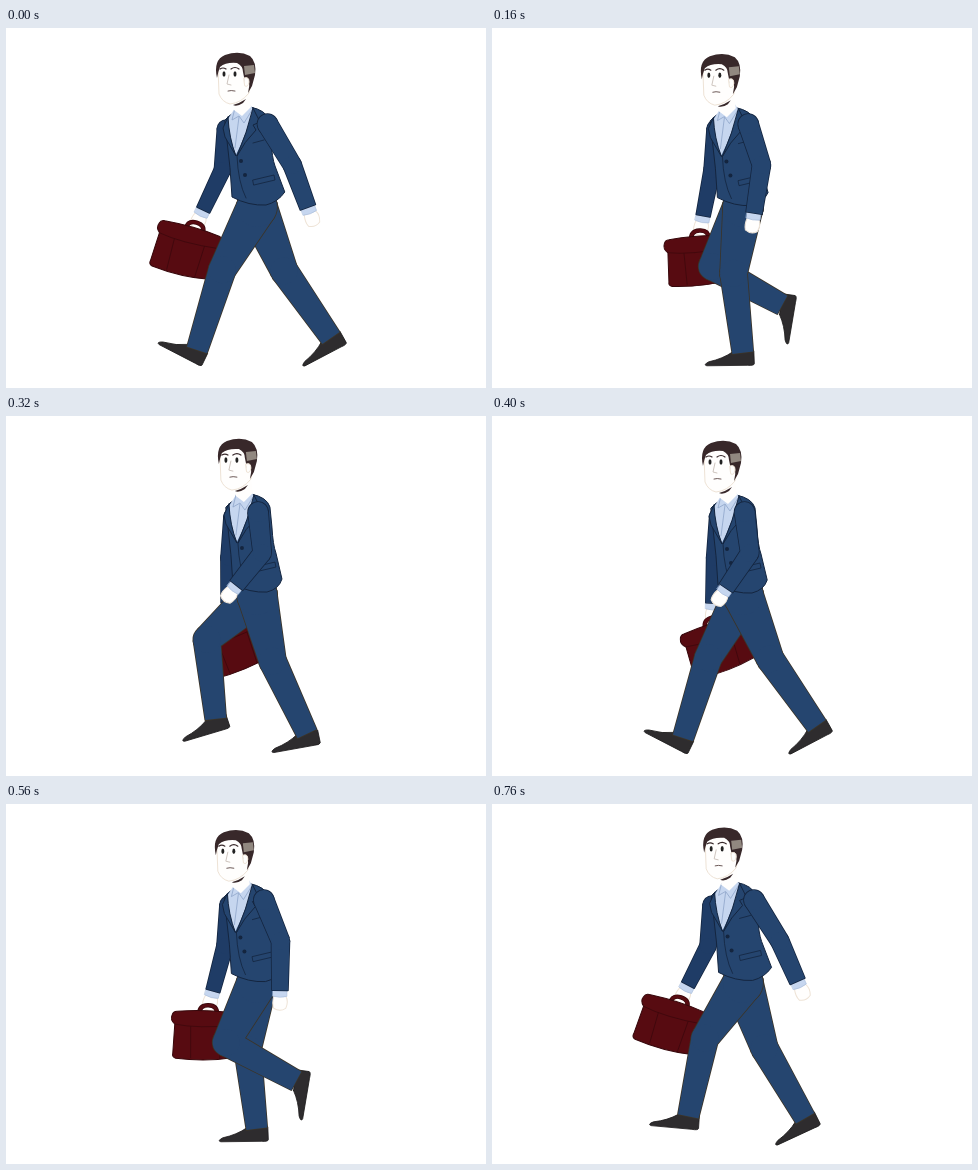
Animation, 480 px wide and 360 px high, one loop 0.8 s. Source, as an HTML page with a canvas:

```html
<!DOCTYPE html>
<html lang="en">
<head>
<meta charset="utf-8">
<title>Walking man</title>
<style>
  html, body { margin: 0; width: 100%; height: 100%; overflow: hidden; background: #fff; }
  canvas { display: block; }
</style>
</head>
<body>
<canvas id="stage" width="480" height="360"></canvas>
<script>
const ctx = document.getElementById('stage').getContext('2d');
const LOOP = 800, STEP = 40;
const SUIT = '#25456f', FAR_SLEEVE = '#1f3c66', LINE = '#14253f', EDGE = '#3b3428', SHIRT = '#c6d6ef';
const SKIN = '#fffefd', SKIN_EDGE = '#eee3d6', HAIR = '#38282a', SHOE = '#2e2c2e';
const BAG = '#570b11', BAG_LINE = '#36070b';
const HIP = [251, 179], THIGH = 67, SHIN = 80;
const FRONT_X = 191, STRIDE = 134;

const clamp = v => Math.min(1, Math.max(0, v));
const smooth = v => v * v * (3 - 2 * v);

function shape(d, fill, stroke, width = 1) {
  const path = new Path2D(d);
  if (fill) { ctx.fillStyle = fill; ctx.fill(path); }
  if (stroke) { ctx.strokeStyle = stroke; ctx.lineWidth = width; ctx.stroke(path); }
}

function placed(x, y, degrees, draw) {
  ctx.save();
  ctx.translate(x, y);
  ctx.rotate(degrees * Math.PI / 180);
  draw();
  ctx.restore();
}

// Tapered, jointed limb; each joint is [x, y, radius]
function limb(a, b, c, fill, edge) {
  const path = new Path2D();
  for (const [p, q] of [[a, b], [b, c]]) {
    const dx = q[0] - p[0], dy = q[1] - p[1], len = Math.hypot(dx, dy);
    const nx = -dy / len, ny = dx / len;
    path.moveTo(p[0] + nx * p[2], p[1] + ny * p[2]);
    path.lineTo(q[0] + nx * q[2], q[1] + ny * q[2]);
    path.lineTo(q[0] - nx * q[2], q[1] - ny * q[2]);
    path.lineTo(p[0] - nx * p[2], p[1] - ny * p[2]);
    path.closePath();
  }
  const joints = new Path2D();
  for (const [x, y, r] of [a, b]) {
    joints.moveTo(x + r, y);
    joints.arc(x, y, r, 0, 2 * Math.PI);
  }
  ctx.strokeStyle = edge;
  ctx.lineWidth = 1.6;
  ctx.stroke(path);
  ctx.stroke(joints);
  ctx.fillStyle = fill;
  ctx.fill(path);
  ctx.fill(joints);
}

// First half of the cycle the foot is planted and drifts back, then it swings forward
function foot(cycle) {
  const p = cycle * 2 % 1;
  if (cycle < 0.5) {
    return {
      x: FRONT_X + STRIDE * p ** 0.88,
      y: 326 - 4 * (1 - p) ** 6 - 16 * p ** 3,
      angle: 28 * clamp(1 - 5 * p) - 27 * smooth(clamp((p - 0.7) / 0.25))
    };
  }
  const lift = Math.sin(Math.PI * p ** 0.7);
  return {
    x: FRONT_X + STRIDE * (1 - smooth(p ** 1.2)),
    y: 310 + 12 * p - 38 * lift,
    angle: -27 + 55 * p - 75 * lift
  };
}

// The knee always bends forward, to the left
function knee(ankle) {
  const dx = ankle.x - HIP[0], dy = ankle.y - HIP[1], d = Math.hypot(dx, dy);
  const along = (THIGH ** 2 - SHIN ** 2 + d * d) / (2 * d);
  const bend = Math.sqrt(Math.max(60, THIGH ** 2 - along ** 2));
  return [HIP[0] + (dx * along - dy * bend) / d, HIP[1] + (dy * along + dx * bend) / d];
}

function leg(cycle) {
  const ankle = foot(cycle % 1);
  placed(ankle.x, ankle.y, ankle.angle, () =>
    shape('M-10 -1 L11 -2 L11.5 11 Q11 13 5 12.5 L-36 13 Q-40 12 -34 9 Q-20 6 -10 -1Z', SHOE, '#1d1b1c', 0.8));
  limb([...HIP, 20], [...knee(ankle), 13.5], [ankle.x, ankle.y, 10.5], SUIT, EDGE);
}

// Cuff and hand continuing the forearm
function hand(elbow, wrist) {
  const angle = Math.atan2(wrist[1] - elbow[1], wrist[0] - elbow[0]) * 180 / Math.PI;
  placed(wrist[0], wrist[1], angle - 90, () => {
    shape('M-6 6 Q-8 13 -6 18 Q0 22 6 18 Q9 11 6 6Z', SKIN, SKIN_EDGE);
    shape('M-7 -1 L7 -1 L7 6 Q0 8 -7 6Z', SHIRT, '#a9bddb', 0.6);
  });
}

function bag() {
  const handle = 'M-9 6 Q-9 -3 0 -3 Q9 -3 9 6';
  shape(handle, null, BAG_LINE, 4.4);
  shape(handle, null, BAG, 3);
  shape('M-31 4 Q0 1 26 4 Q31 6 30 14 L29 48 Q0 54 -31 51 Q-35 50 -34 46 L-33 17 Q-38 13 -36 8 Q-35 4 -31 4Z', BAG, BAG_LINE);
  shape('M-33 17 Q-10 21 29 16 M-17 19 L-16 50 M14 18 L13 50', null, BAG_LINE, 0.6);
}

function torso(swing) {
  const hem = 277 + 2 * swing;
  shape(`M219 92 Q226 83 244 79 Q260 82 263 92 L265 112 Q266 130 269 138 L${hem} 164 Q272 174 260 177 Q243 178 226 169 L224 140Z`, SUIT, LINE);
  shape('M222 91 L229 80 L243 75 L247 81 Q241 105 230 127 Q223 112 222 91Z', SHIRT);
  shape('M229 80 L226 92 L233 88 L238 95 L246 82 M233 89 L229 120', null, '#8fa5ca', 0.8);
  shape('M247 80 L254 94 L247 97 L250 102 Q238 114 231 128 Q241 105 247 80Z', SUIT, LINE);
  shape('M222 89 L217 100 L219 109 L230 128 Q223 110 222 89Z', SUIT, LINE);
  shape('M231 128 Q232 154 240 170 M247 115 L258 112 M247 152 L268 147 L269 152 L248 157Z', null, LINE, 0.8);
  for (const [x, y] of [[235, 133], [239, 147]]) {
    shape(`M${x - 2} ${y} a2 2 0 1 0 4 0 a2 2 0 1 0 -4 0`, LINE);
  }
}

function head() {
  shape('M228 70 L228 82 L236 88 L245 79 L243 64Z', SKIN);
  shape('M227 77 Q234 75 240 71 L237 75 Q231 79 227 77Z', HAIR);
  shape('M212 40 L213 66 Q216 74 224 76 Q235 75 243 65 L246 50 L240 32 L218 32Z', SKIN, SKIN_EDGE);
  shape('M211 50 Q207 32 219 27 Q233 22 244 28 Q251 34 249 47 L246 58 L242 65 Q244 58 243 51 L239 54 L237 44 Q237 38 231 35 Q220 34 214 39 Q212 44 211 50Z', HAIR);
  shape('M238 38 L248 37 L249 45 L239 47Z', '#918880');
  shape('M238 50 Q243 48 243 54 Q242 60 239 58Z', SKIN, SKIN_EDGE);
  shape('M214 41 Q217 39 220 41 M225 41 Q229 38 233 41', null, HAIR, 1.2);
  for (const x of [218, 229]) {
    shape(`M${x - 1.5} 46 a1.5 2.8 0 1 0 3 0 a1.5 2.8 0 1 0 -3 0`, '#222');
  }
  shape('M223 47 L221 56 L225 57', null, '#c9bfb8', 0.9);
  shape('M222 63 Q225 62 229 63', null, '#6d5a58');
}

function draw(time) {
  const cycle = time / LOOP;
  const swing = Math.cos(2 * Math.PI * (time - 740) / LOOP);
  const bob = 2 * Math.sin(4 * Math.PI * cycle);
  ctx.fillStyle = '#fff';
  ctx.fillRect(0, 0, 480, 360);
  ctx.lineJoin = ctx.lineCap = 'round';

  const farElbow = [219.5 - 3.5 * swing, 142, 8];
  const grip = [205 - 17 * swing, 205 - 4 * swing - 5 * swing ** 2];
  const farWrist = [...grip.map((v, i) => farElbow[i] + (v - farElbow[i]) * 0.72), 7];
  hand(farElbow, farWrist);
  placed(...grip, 19 * swing - 1, bag);
  limb([farElbow[0] + 4, 101, 9], farElbow, farWrist, FAR_SLEEVE, LINE);

  leg(cycle + 0.5);
  leg(cycle);
  placed(-bob / 2, bob / 2, 0, () => torso(swing));
  placed(-bob, bob, 0, head);

  const nearElbow = [272 + 16 * swing, 137, 9];
  const nearWrist = [268 + 38 * swing, 186 + 4 * swing - 13 * swing ** 2, 8];
  hand(nearElbow, nearWrist);
  limb([257 + 5 * swing, 96, 10], nearElbow, nearWrist, SUIT, LINE);
}

function tick(now) {
  draw(Math.floor(now / STEP) * STEP % LOOP);
  requestAnimationFrame(tick);
}
draw(0);
requestAnimationFrame(tick);
</script>
</body>
</html>
```
